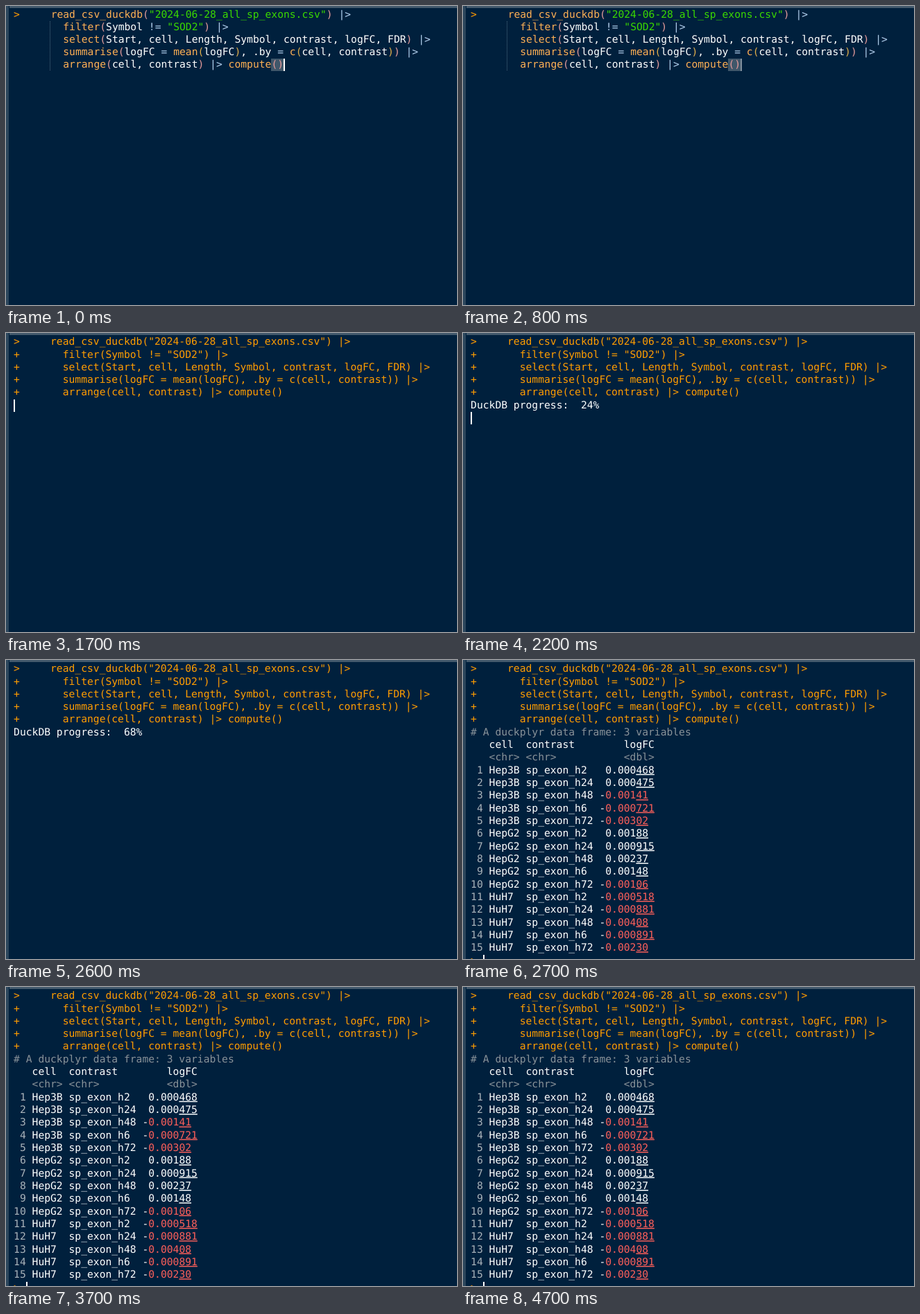
An HTML page for the animation above (4800 ms loop, 650 by 432 pixels).

```html
<!DOCTYPE html>
<html lang="en">
<head>
<meta charset="utf-8">
<title>Console session</title>
<style>
  html, body { margin: 0; width: 100%; height: 100%; overflow: hidden; background: #00203d; }
  svg { display: block; width: 650px; height: 432px; }
  text {
    font: 14.66px "DejaVu Sans Mono", monospace;
    white-space: pre;
    text-rendering: geometricPrecision;
  }
</style>
</head>
<body>
<svg id="stage" viewBox="0 0 650 432" xmlns="http://www.w3.org/2000/svg"></svg>
<script>
const LOOP = 4800;
const ADVANCE = 8.826;
const LEFT = 11.1;
const BASELINE = 17.2;
const EDIT_STEP = 18;
const PRINT_STEP = 18.32;

const WHITE = '#ffffff', ORANGE = '#ff9d00', CALL = '#ffb054', STRING = '#3ad900';
const OPERATOR = '#b4d0ee', RED = '#ff5f5a', GRAY = '#899299', ROW_ID = '#aab3ba';
const PARENS = ['#e39a9a', '#e0ae4a'];

const CODE = [
  'read_csv_duckdb("2024-06-28_all_sp_exons.csv") |>',
  '  filter(Symbol != "SOD2") |>',
  '  select(Start, cell, Length, Symbol, contrast, logFC, FDR) |>',
  '  summarise(logFC = mean(logFC), .by = c(cell, contrast)) |>',
  '  arrange(cell, contrast) |> compute()'
];

const CELLS = ['Hep3B', 'HepG2', 'HuH7'];
const CONTRASTS = ['h2', 'h24', 'h48', 'h6', 'h72'];
const LOG_FC = `0.000468 0.000475 -0.00141 -0.000721 -0.00302
  0.00188 0.000915 0.00237 0.00148 -0.00106
  -0.000518 -0.000881 -0.00408 -0.000891 -0.00230`.split(/\s+/);

const stage = document.getElementById('stage');

function add(parent, tag, attrs = {}, content = '') {
  const node = document.createElementNS('http://www.w3.org/2000/svg', tag);
  for (const key in attrs) node.setAttribute(key, attrs[key]);
  node.textContent = content;
  return parent.appendChild(node);
}

const rect = (parent, x, y, width, height, fill) =>
  add(parent, 'rect', { x, y, width, height, fill });

const write = (parent, x, y, fill, content, extra = {}) =>
  add(parent, 'text', { x, y, fill, ...extra }, content);

const print = (parent, row, col, fill, content, extra) =>
  write(parent, LEFT + col * ADVANCE, BASELINE + row * PRINT_STEP, fill, content, extra);

function tokens(line) {
  let depth = 0;
  const pattern = /"[^"]*"|\w+(?=\()|[()]|[\w.]+|\|>|!=|=|,|\s+/g;
  return line.match(pattern).map((word, i, all) => {
    let color = WHITE;
    if (word === '(') color = PARENS[depth++ % 2];
    else if (word === ')') color = PARENS[--depth % 2];
    else if (word[0] === '"') color = STRING;
    else if (all[i + 1] === '(') color = CALL;
    else if (/^[|!=]/.test(word)) color = OPERATOR;
    return [word, color];
  });
}

function buildEditor() {
  const group = add(stage, 'g');
  const left = LEFT + 0.6;
  add(group, 'line', {
    x1: 63.5, x2: 63.5, y1: 22, y2: 94,
    stroke: '#506a7e', 'stroke-dasharray': '1 1'
  });
  rect(group, 382, 76, 18, 18, '#40576a');
  write(group, LEFT, BASELINE, ORANGE, '>');
  CODE.forEach((line, row) => {
    const text = write(group, left + 6 * ADVANCE, BASELINE + row * EDIT_STEP, WHITE, '');
    for (const [word, fill] of tokens(line)) add(text, 'tspan', { fill }, word);
  });
  return group;
}

function buildEcho() {
  const group = add(stage, 'g');
  CODE.forEach((line, row) => {
    print(group, row, 0, ORANGE, (row ? '+' : '>') + '     ' + line);
  });
  return group;
}

function buildTable() {
  const group = add(stage, 'g');
  const italic = { 'font-style': 'italic' };
  print(group, 5, 0, GRAY, '# A duckplyr data frame: 3 variables');
  print(group, 6, 3, WHITE, 'cell  contrast           logFC'.slice(0, 14));
  print(group, 6, 25, WHITE, 'logFC');
  for (const [col, type] of [[3, '<chr>'], [9, '<chr>'], [25, '<dbl>']]) {
    print(group, 7, col, GRAY, type, italic);
  }
  LOG_FC.forEach((value, i) => {
    const row = 8 + i;
    const negative = value[0] === '-';
    const digits = value.replace('-', '');
    const color = negative ? RED : WHITE;
    print(group, row, 0, ROW_ID, String(i + 1).padStart(2));
    print(group, row, 3, WHITE, CELLS[Math.floor(i / 5)]);
    print(group, row, 9, WHITE, 'sp_exon_' + CONTRASTS[i % 5]);
    if (negative) print(group, row, 21, WHITE, '-');
    print(group, row, 22, color, digits.slice(0, 5));
    print(group, row, 27, color, digits.slice(5), { 'text-decoration': 'underline' });
  });
  print(group, 23, 0, ORANGE, '>');
  return group;
}

rect(stage, 0, 0, 650, 432, '#00203d');
rect(stage, 0, 0, 4, 432, '#2c465c');
rect(stage, 5, 0, 645, 3, '#43596c');
const editor = buildEditor();
const echo = buildEcho();
const progress = print(stage, 5, 0, WHITE, '');
const table = buildTable();
const cursor = rect(stage, 0, 0, 2, 18, WHITE);

const show = (node, visible) => node.setAttribute('display', visible ? 'inline' : 'none');

function cursorOpacity(t) {
  if (t >= 800 && t < 900) return 0.5;
  const hidden = [[500, 800], [1500, 1700], [2300, 2700], [3300, 3700], [4300, 4700]];
  return hidden.some(([from, to]) => t >= from && t < to) ? 0 : 1;
}

function cursorPlace(t) {
  if (t < 1700) return [400, 76];
  const row = t < 2100 ? 5 : t < 2700 ? 6 : 23;
  return [row === 23 ? 29 : 11, Math.round(4.4 + row * PRINT_STEP)];
}

function render(t) {
  show(editor, t < 1700);
  show(echo, t >= 1700);
  show(progress, t >= 2100 && t < 2700);
  show(table, t >= 2700);
  const percent = 13 + 11 * Math.floor((t - 2100) / 100);
  progress.textContent = `DuckDB progress:  ${percent}%`;
  const [x, y] = cursorPlace(t);
  cursor.setAttribute('x', x);
  cursor.setAttribute('y', y);
  cursor.setAttribute('opacity', cursorOpacity(t));
}

const start = performance.now();
function tick() {
  render((performance.now() - start) % LOOP);
  requestAnimationFrame(tick);
}
tick();
</script>
</body>
</html>
```
